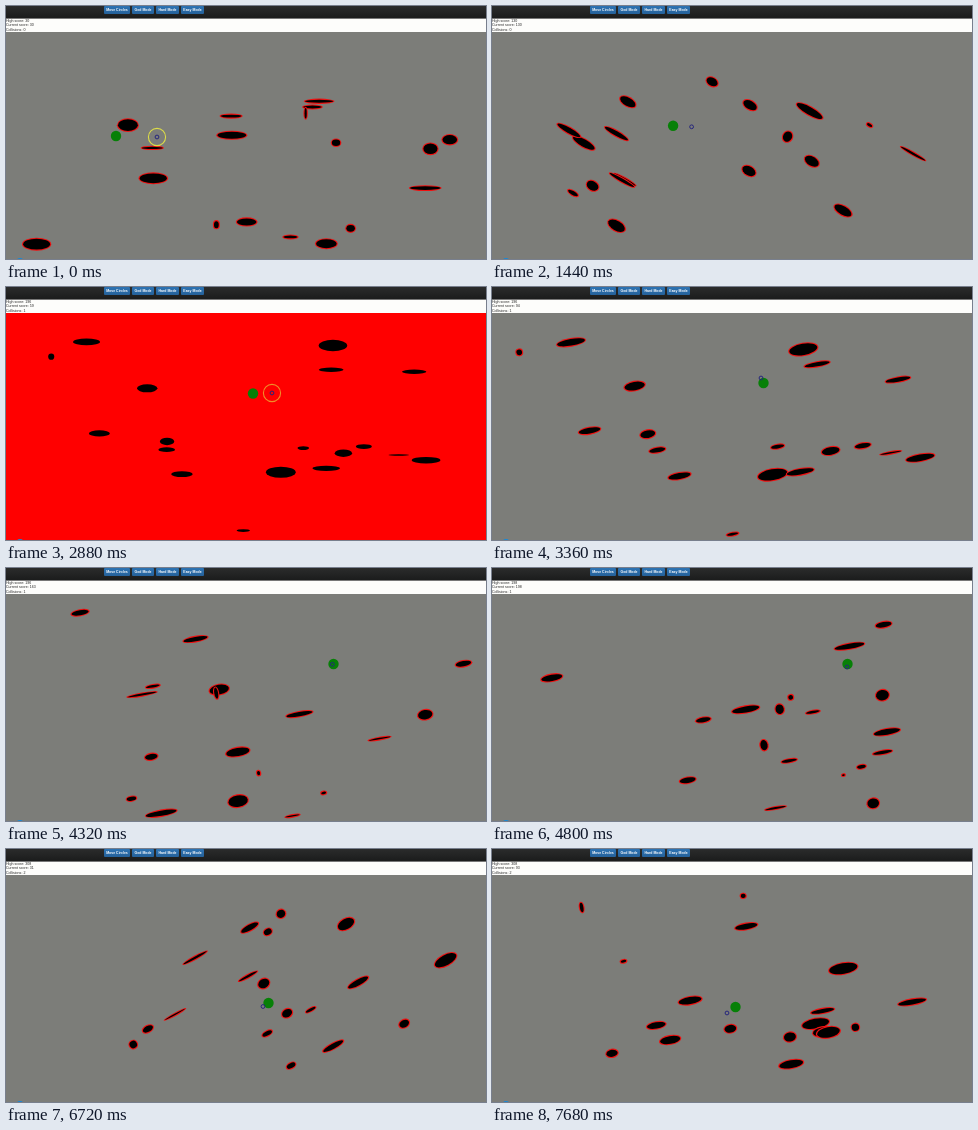
Write an HTML page with a canvas that moves like this. It is 480 by 253 pixels and loops after 8 s.

```html
<!DOCTYPE html>
<html lang="en">
<head>
<meta charset="utf-8">
<title>Collider</title>
<style>
  html, body { margin: 0; width: 100%; height: 100%; overflow: hidden; background: #fdfdfb; }
  body { position: relative; font-family: "Liberation Sans", Arial, sans-serif; }
  nav { position: absolute; width: 480px; height: 12px; border-bottom: 1px solid #777; background: linear-gradient(#2b2c2c, #1b1c1c); }
  nav span { position: absolute; top: 0; height: 8px; border-radius: 1px; background: linear-gradient(#2d73b3, #25619a);
    color: #fff; font: bold 3.5px/8.4px "Liberation Sans", Arial, sans-serif; text-align: center; white-space: nowrap; }
  #stats { position: absolute; top: 12.6px; left: 0; font-size: 3.6px; line-height: 4.8px; color: #222; white-space: pre; }
  canvas { position: absolute; left: 0; top: 26px; }
</style>
</head>
<body>
<nav>
  <span style="left:98px;width:26px">Move Circles</span>
  <span style="left:126px;width:22px">God Mode</span>
  <span style="left:150px;width:23px">Hard Mode</span>
  <span style="left:175px;width:23px">Easy Mode</span>
</nav>
<div id="stats"></div>
<canvas width="480" height="227"></canvas>
<script>
const ctx = document.querySelector('canvas').getContext('2d');
const stats = document.getElementById('stats');
const LOOP = 8000, STEP = 480, TOP = 26;
const ENEMIES = 18, LEG = 1000, LEG_START = 120;

// A run lasts from one collision to the next
const runs = [
  { start: 0, base: 30, rate: 33.2, best: 0 },
  { start: 6, base: 59, rate: 34.7, best: 196 },
  { start: 13, base: 0, rate: 31, best: 308 },
];

// Step, enemy tilt in degrees, player x and y, pointer offset from the player
const path = [
  [0, 0, 110, 130, 41, 1],
  [5, 49, 228.5, 113, 3.5, 1],
  [6, 0, 247, 106.5, 19, -0.5],
  [7, -10, 271.5, 96, -2.5, -5],
  [10, -10, 355.5, 96, -0.5, 3],
  [12, -47, 281.5, 150, -2.5, 1],
  [16, -10, 243.5, 158, -8.5, 6],
];

function random(...seed) {
  const v = Math.sin(seed.reduce((sum, s) => sum * 17.31 + s, 4.7)) * 43758.5453;
  return v - Math.floor(v);
}
const mix = (a, b, t) => a + (b - a) * t;
const easeInOut = t => t < 0.5 ? 4 * t ** 3 : 1 - 4 * (1 - t) ** 3;

function pathAt(step) {
  const i = Math.min(path.findLastIndex(p => p[0] <= step), path.length - 2);
  const a = path[i], b = path[i + 1];
  const t = (step - a[0]) / (b[0] - a[0]);
  return a.map((v, n) => mix(v, b[n], t));
}

// Every enemy eases to a new random place and size on each leg
function enemyAt(id, time) {
  const legs = (time - LEG_START) / LEG + 1;
  const leg = Math.floor(legs), t = easeInOut(legs - leg);
  const between = (field, low, high) =>
    mix(low, high, mix(random(id, leg, field), random(id, leg + 1, field), t));
  return [between(1, 10, 470), between(2, 38, 250), between(3, 2, 17), between(4, 1.6, 7)];
}

function ellipse(x, y, rx, ry, angle, fill) {
  if (rx <= 0 || ry <= 0) return;
  ctx.beginPath();
  ctx.ellipse(x, y - TOP, rx, ry, angle, 0, 2 * Math.PI);
  ctx.fillStyle = fill;
  ctx.fill();
}

function ring(x, y, r, color, width) {
  ctx.beginPath();
  ctx.arc(x, y - TOP, r, 0, 2 * Math.PI);
  ctx.strokeStyle = color;
  ctx.lineWidth = width;
  ctx.stroke();
}

function draw(step) {
  const level = runs.findLastIndex(r => r.start <= step);
  const run = runs[level];
  const hit = level > 0 && step === run.start;
  const [, tilt, px, py, dx, dy] = pathAt(step);

  ctx.fillStyle = hit ? '#f00' : '#7c7d79';
  ctx.fillRect(0, 0, 480, 227);
  ellipse(14, 254, 3, 2, 0, '#1688d8');

  for (let id = 0; id < ENEMIES; id++) {
    const [x, y, rx, ry] = enemyAt(id, step * STEP);
    const angle = tilt * Math.PI / 180;
    ellipse(x, y, rx, ry, angle, hit ? '#f00' : '#f01010');
    ellipse(x, y, rx - 1.1, ry - 1.1, angle, '#000');
  }

  ellipse(px, py, 5.2, 5.2, 0, '#078007');
  ring(px + dx, py + dy, 1.9, '#26267c', 1);
  if (step === 0 || step === 6) ring(px + dx, py + dy, 8.6, hit ? '#f08c28' : '#dcdc48', 1.1);

  const score = Math.round(run.base + run.rate * (step - run.start));
  stats.textContent =
    `High score: ${Math.max(run.best, score)}\nCurrent score: ${score}\nCollisions: ${level}`;
}

function tick() {
  draw(Math.floor(performance.now() % LOOP / STEP));
  requestAnimationFrame(tick);
}
tick();
</script>
</body>
</html>
```
